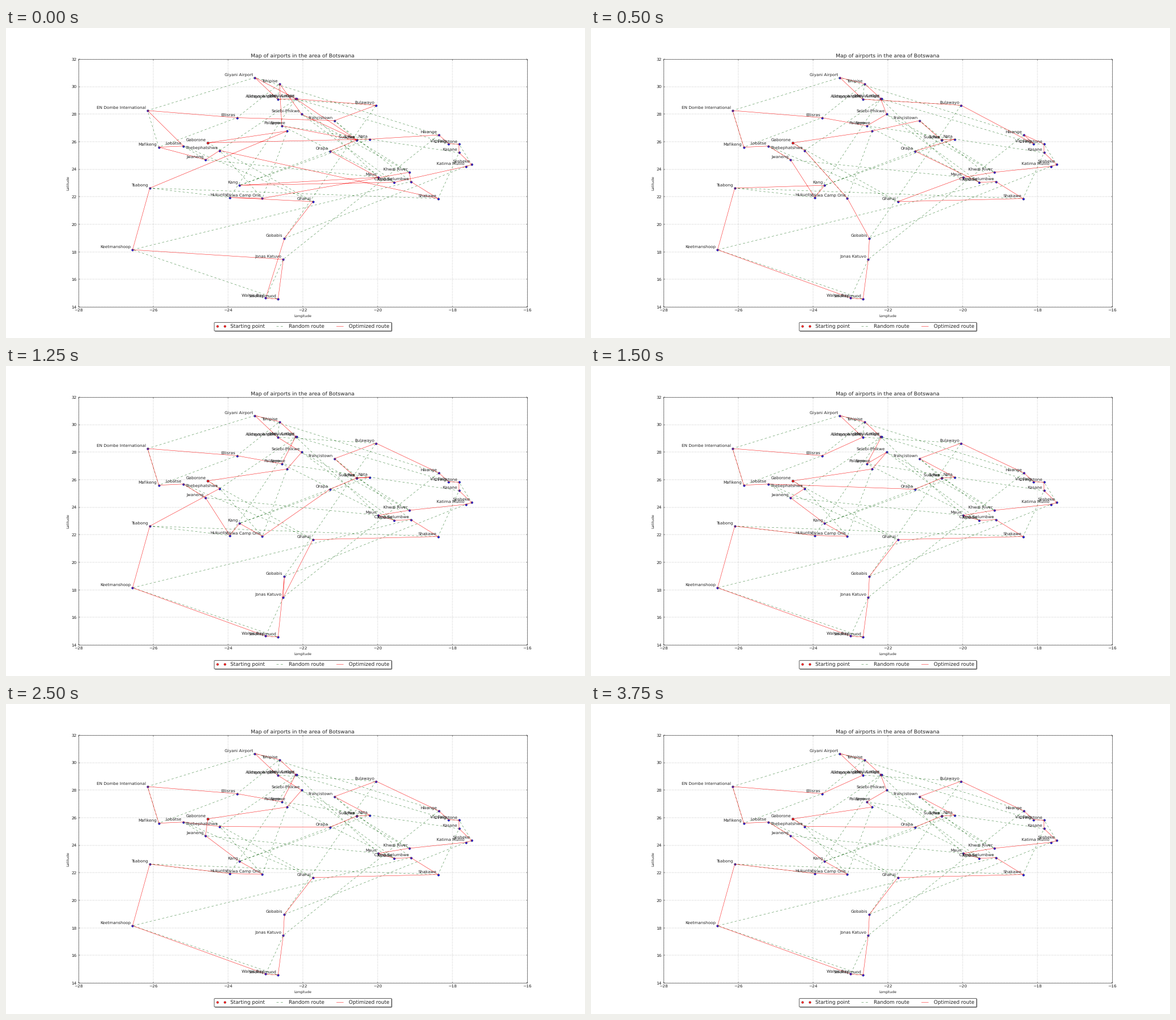
Write a matplotlib script that moves like this. It is 1022 px wide and 548 px high and loops after 5 s.

```python
import matplotlib.pyplot as plt
from matplotlib.animation import FuncAnimation

WIDTH, HEIGHT, DPI = 1022, 548, 64
STEPS, STEP_MS = 20, 250
INK = "#222222"
RED, GREEN, BLUE = "#fa1414", "#2f7a2f", "#1a12e0"


def px(n):
    """Pixels to points."""
    return n * 72 / DPI


plt.rcParams.update({
    "font.family": "DejaVu Sans",
    "text.hinting": "none",
    "text.color": INK,
    "axes.labelcolor": INK,
    "lines.scale_dashes": False,
})

AIRPORTS = {
    "Gab": (-24.54, 25.915, "Gaborone"),
    "Giy": (-23.28, 30.655, "Giyani Airport"),
    "Tsh": (-22.62, 30.205, "Tshipise"),
    "Ald": (-22.67, 29.08, "Alldays Airport"),
    "Lim": (-22.17, 29.10, "Limpopo Valley Airfield"),
    "Mek": (-22.19, 29.12, "Meko Lodge"),
    "Bul": (-20.04, 28.645, "Bulawayo"),
    "Sel": (-22.03, 27.99, "Selebi-Phikwe"),
    "Fra": (-21.15, 27.53, "Francistown"),
    "Ell": (-23.76, 27.74, "Ellisras"),
    "Pal": (-22.56, 27.15, "Palapye"),
    "Ser": (-22.42, 26.77, "Serowe"),
    "Sua": (-20.55, 26.12, "Sua Pan"),
    "Sow": (-20.56, 26.11, "Sowa"),
    "Nat": (-20.21, 26.18, "Nata"),
    "Hwa": (-18.36, 26.49, "Hwange"),
    "Vic": (-18.10, 25.85, "Vic Falls"),
    "Liv": (-17.82, 25.82, "Livingstone"),
    "Kas": (-17.82, 25.20, "Kasane"),
    "Ses": (-17.48, 24.335, "Sesheke"),
    "Kat": (-17.63, 24.21, "Katima Mulilo"),
    "Khw": (-19.15, 23.78, "Khwai River"),
    "Sha": (-18.38, 21.87, "Shakawe"),
    "Mau": (-19.98, 23.41, "Maun"),
    "Cam": (-19.11, 23.10, "Camp Selumbwe"),
    "Xax": (-19.55, 23.05, "Xaxaba"),
    "Kan": (-23.69, 22.83, "Kang"),
    "Huk": (-23.95, 21.95, "Hukuntsi"),
    "Okw": (-23.08, 21.89, "Okwa Camp One"),
    "Gha": (-21.73, 21.65, "Ghanzi"),
    "Gob": (-22.49, 18.98, "Gobabis"),
    "Jon": (-22.52, 17.46, "Jonas Katuvo"),
    "Wal": (-22.99, 14.65, "Walvis Bay"),
    "Swa": (-22.66, 14.58, "Swakopmund"),
    "Kee": (-26.55, 18.155, "Keetmanshoop"),
    "Tsa": (-26.09, 22.63, "Tsabong"),
    "Maf": (-25.85, 25.60, "Mafikeng"),
    "Lob": (-25.19, 25.68, "Lobatse"),
    "Jwa": (-24.60, 24.69, "Jwaneng"),
    "The": (-24.22, 25.36, "Thebephatshwa"),
    "Ora": (-21.27, 25.31, "Orapa"),
    "Dom": (-26.15, 28.26, "EN Dombe International"),
}

RANDOM = """Gab Gha Lob Jwa Mau Mek Huk Tsa Sha Kas Pal Xax Sel Khw Sua Nat Kan
    Ora Sow Fra Cam Kee Swa Wal Jon Hwa Giy Dom Maf Ell Tsh Ald Bul Gob Kat
    Ses Liv Vic Lim The Okw Ser""".split()

# Shared stretches of the later tours
EAST = "Bul Hwa Vic Liv Kas Ses Kat Khw Mau Xax Cam Sha Gha"
SOUTH = "Gob Jon Swa Wal Kee Tsa"

TOUR_A = """Gab Ser Tsa Kee Jon Swa Wal Gob Gha Huk Okw Khw Cam Sha The Jwa Maf
    Lob Dom Ell Fra Bul Lim Ald Giy Mek Sua Sel Tsh Pal Sow Ora Mau Kan Xax
    Kat Ses Kas Liv Vic Hwa Nat""".split()
TOUR_B = """Gab Ser Jwa The Pal Fra Sel Ald Tsh Giy Lim Mek Bul Nat Hwa Liv Kas
    Ses Sha Xax Okw Huk Tsa Kee Jon Swa Wal Gob Gha Cam Khw Kat Vic Sua Sow
    Ora Mau Kan Maf Dom Ell Lob""".split()
TOUR_C = """Gab Ser Fra Sow Sua Nat Ora Xax Cam Sha Gha Mau Khw Kat Ses Kas Liv
    Hwa Vic Bul Ald Giy Tsh Lim Mek Sel Pal Ell Dom Maf Lob Jwa Kan Huk Tsa
    Kee Wal Swa Gob Jon Okw The""".split()
TOUR_D = f"""Gab Ser Sel Ald Giy Tsh Lim Mek Pal Ell Dom Maf Lob Jwa Huk Kan Okw
    Ora Sua Nat Sow Fra {EAST} Jon Gob Swa Wal Kee Tsa The""".split()
TOUR_E = f"""Gab Ser Sel Pal Lim Mek Tsh Giy Ald Ell Dom Lob Maf Ora Sua Sow Nat
    Fra {EAST} {SOUTH} Huk Okw Kan Jwa The""".split()
TOUR_F = f"""Gab Ser Sel Ald Giy Tsh Lim Mek Pal Ell Dom Maf Lob The Ora Sua Sow
    Nat Fra {EAST} {SOUTH} Huk Okw Kan Jwa""".split()
BEST = f"""Gab The Ora Sua Sow Nat Fra {EAST} {SOUTH} Huk Okw Kan Jwa Lob Maf
    Dom Ell Ald Giy Tsh Lim Mek Sel Pal Ser""".split()


def flip(tour, first, last):
    """Two-opt move: reverse the stretch from first to last."""
    i, j = tour.index(first), tour.index(last) + 1
    return tour[:i] + tour[i:j][::-1] + tour[j:]


TOURS = [
    TOUR_A,
    TOUR_B,
    flip(flip(TOUR_C, "Kan", "Huk"), "Gob", "Jon"),
    TOUR_C,
    flip(TOUR_D, "Huk", "Kan"),
    TOUR_D,
    flip(TOUR_E, "Lob", "Maf"),
    flip(TOUR_E, "Jwa", "The"),
    TOUR_E,
    flip(TOUR_F, "Sel", "Pal"),
    TOUR_F,
    flip(BEST, "The", "Jwa"),
    flip(BEST, "Sel", "Pal"),
    BEST,
]


def path(stops):
    return tuple(zip(*(AIRPORTS[s][:2] for s in stops)))


fig = plt.figure(figsize=(WIDTH / DPI, HEIGHT / DPI), dpi=DPI, facecolor="white")
ax = fig.add_axes([0.125, 0.1, 0.775, 0.8])
ax.set(xlim=(-28, -16), ylim=(14, 32),
       xticks=range(-28, -15, 2), yticks=range(14, 33, 2))
ax.grid(color="black", lw=px(0.35), ls=(0, (px(0.625), px(1.875))))
ax.tick_params(direction="in", top=True, right=True, length=px(2.5),
               width=px(0.35), pad=px(2.8), labelsize=px(7.4), labelcolor=INK)
for spine in ax.spines.values():
    spine.set_linewidth(px(0.5))
ax.set_title("Map of airports in the area of Botswana",
             fontsize=px(9.27), pad=px(3.1))
ax.set_xlabel("Longitude", fontsize=px(6.2), labelpad=px(3.1))
ax.set_ylabel("Latitude", fontsize=px(6.2), labelpad=px(3.1))

dot = dict(ls="none", marker="o", ms=px(3.75), mec="black", mew=px(0.25))
ax.plot(*path(AIRPORTS), color=BLUE, **dot)
start, = ax.plot(*path(["Gab"]), color=RED, label="Starting point", **dot)
shuffled, = ax.plot(*path(RANDOM), color=GREEN, lw=px(0.52),
                    ls=(0, (px(3.75), px(3.75))), label="Random route")
route, = ax.plot([], [], color=RED, lw=px(0.55), label="Optimized route")

for key, (x, y, name) in AIRPORTS.items():
    rise = 12 if key == "Ser" else 3.1
    ax.annotate(name, (x, y), xytext=(px(-3.1), px(rise)),
                textcoords="offset points", ha="right", va="baseline",
                fontsize=px(7.3), zorder=4)

legend = ax.legend(handles=[start, shuffled, route], loc="upper center",
                   bbox_to_anchor=(0.5, -0.05), ncol=3, numpoints=2,
                   fontsize=px(8.9), handlelength=2, handletextpad=0.8,
                   columnspacing=2, borderpad=0.4, borderaxespad=0.5,
                   fancybox=True, framealpha=1, edgecolor="black",
                   shadow={"ox": px(1.25), "oy": px(-1.25)})
legend.get_frame().set_linewidth(px(0.6))


def draw(step):
    tour = TOURS[min(step, len(TOURS) - 1)]
    route.set_data(*path(tour + tour[:1]))
    return route,


anim = FuncAnimation(fig, draw, frames=STEPS, init_func=lambda: draw(0),
                     interval=STEP_MS, repeat=True, repeat_delay=0)
plt.show()
```
